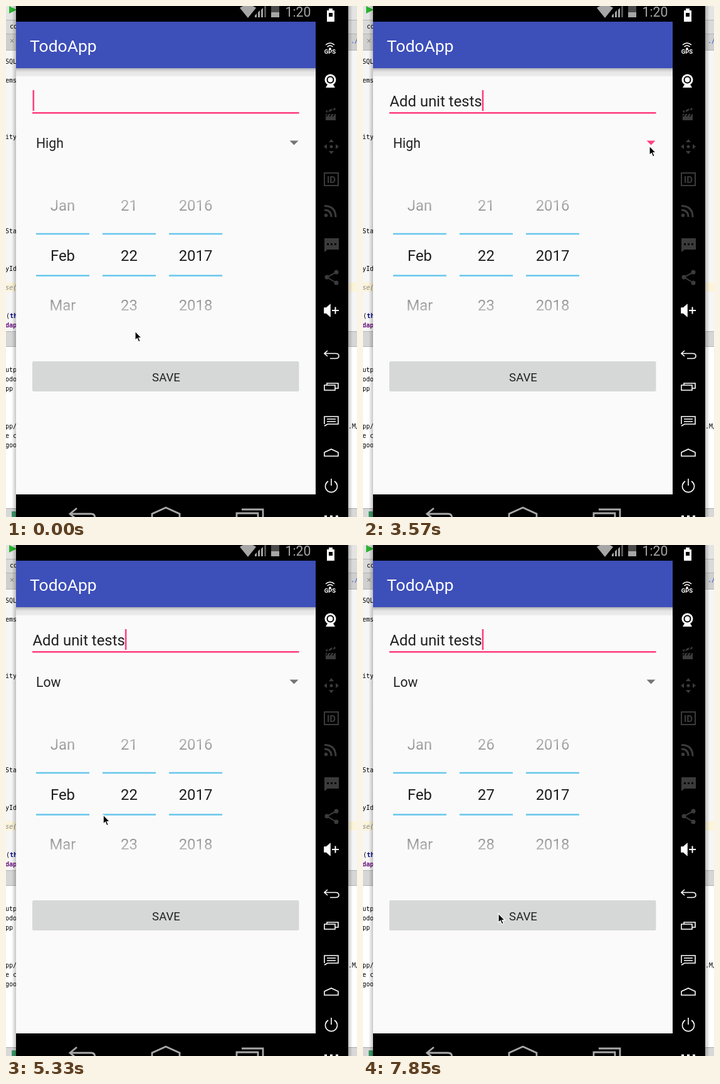
Recreate the animation shown at these times as an HTML page. Size 560x814 px, loop 8 s.

```html
<!DOCTYPE html>
<html lang="en">
<head>
<meta charset="utf-8">
<title>TodoApp</title>
<style>
  html, body { margin: 0; height: 100%; overflow: hidden; background: #fff; }
  svg { display: block; width: 560px; height: 814px; font-family: Roboto, sans-serif; }
  text { white-space: pre; }
  .code { font: 10px "DejaVu Sans Mono", monospace; }
  .pick { font-size: 23.9px; text-anchor: middle; fill: url(#fade); }
  .line { fill: none; stroke: #fff; stroke-width: 1.6; }
  .item { font-size: 18.6px; fill: #111; }
  #sheet { filter: drop-shadow(0 3px 4px #0008); }
</style>
</head>
<body>
<svg viewBox="0 0 560 814">
  <defs>
    <linearGradient id="fade" gradientUnits="userSpaceOnUse" x1="0" x2="0" y1="278" y2="517">
      <stop offset="0" stop-color="#1c1c1c" stop-opacity="0"/>
      <stop offset=".44" stop-color="#1c1c1c"/>
      <stop offset=".56" stop-color="#1c1c1c"/>
      <stop offset="1" stop-color="#1c1c1c" stop-opacity="0"/>
    </linearGradient>
    <linearGradient id="drop" x2="0" y2="1">
      <stop offset="0" stop-color="#a9abb5"/>
      <stop offset=".25" stop-color="#d2d2d4"/>
      <stop offset=".5" stop-color="#e6e6e6"/>
      <stop offset="1" stop-color="#ececec"/>
    </linearGradient>
    <linearGradient id="edge">
      <stop offset="0" stop-opacity="0"/>
      <stop offset="1" stop-opacity=".22"/>
    </linearGradient>
  </defs>

  <!-- editor window behind the phone -->
  <g id="editor">
    <rect width="560" height="814" fill="#f6f6f6"/>
    <rect width="560" height="22" fill="#e4e4e4"/>
    <rect y="22" width="560" height="22" fill="#dadada"/>
    <rect y="44" width="560" height="26" fill="#cfcfcf"/>
    <path d="M0 22.5H560M0 44.5H560M0 70.5H560" stroke="#b4b4b4"/>
    <rect y="440" width="560" height="15" fill="#fbf4da"/>
    <rect y="518" width="560" height="25" fill="#d6d6d6"/>
    <path d="M0 518.5H560M0 542.5H560" stroke="#b4b4b4"/>
    <rect y="543" width="560" height="257" fill="#fff"/>
    <rect y="800" width="560" height="14" fill="#d8d8d8"/>
    <path d="M0 800.5H560" stroke="#aaa"/>
    <path d="M5 0L17 6L5 12Z" fill="#27b52c"/>
    <rect x="9" y="805" width="9" height="9" fill="#3f9b6a"/>
    <path d="M7 53l5 5m0-5l-5 5" stroke="#666"/>
    <g class="code">
      <text x="6" y="36">co</text>
      <text x="550" y="59" fill="#2b50c8">./a</text>
      <text x="0" y="497">(<tspan fill="#000080" font-weight="bold">th</tspan></text>
      <text x="-1" y="512" fill="#660e7a" font-weight="bold">dap</text>
      <text x="-1" y="452" fill="#888" font-style="italic">se(</text>
      <text x="546" y="673">.M/</text>
    </g>
  </g>
  <rect x="9" width="7" height="814" fill="url(#edge)"/>
  <rect x="546" width="7" height="814" fill="url(#edge)" transform="matrix(-1 0 0 1 1099 0)"/>

  <!-- phone -->
  <rect x="16" width="530" height="814"/>
  <rect x="16" y="25" width="478" height="753" fill="#fafafa"/>
  <rect x="16" y="25" width="478" height="74.500" fill="#3d4fb9"/>
  <rect x="16" y="99" width="478" height="13" fill="url(#drop)"/>
  <text x="38" y="73" font-size="26.500" fill="#fff">TodoApp</text>
  <g fill="#a6a6a6">
    <path d="M373 3Q386 -6 399 3L386 19Z"/>
    <path d="M397 18v-3l3-3v6zm5 0v-8l3-3v11zm5 0V6l3-3v15z"/>
    <path d="M412 18V1l3-3v20z" fill="#555"/>
    <path d="M423 0h13v10h-13z" fill="#4a4a4a"/>
    <path d="M423 10h13v8h-13z"/>
    <text x="445.500" y="17" font-size="21.200">1:20</text>
  </g>
  <g class="line" style="stroke:#a8a8a8;stroke-width:2.8">
    <path d="M113 800L102 809L113 818M102 809H136Q142 809 142 816"/>
    <path d="M233 816V809L255 799L277 809V816"/>
    <path d="M368 816V808H402V816M376 802H410V816"/>
  </g>

  <!-- emulator side bar -->
  <g fill="#fff">
    <path d="M515 4h6v3h3v18h-12V7h3z"/>
    <rect x="515" y="11" width="6" height="6" fill="#000"/>
    <path class="line" d="M510 62q7-6 14 0M512.500 65q4.500-4 9 0"/>
    <circle cx="517" cy="68" r="1.800"/>
    <text x="517" y="76" font-size="9.500" font-weight="bold" text-anchor="middle">GPS</text>
    <circle cx="517.500" cy="117.500" r="9"/>
    <circle cx="517.500" cy="117.500" r="5" fill="none" stroke="#000" stroke-width="2"/>
    <path d="M513 125h9l3 5h-15z"/>
    <path class="line" d="M508 481h3l6-5v18l-6-5h-3z" style="fill:#fff"/>
    <path class="line" d="M520 485h11M525.500 479.500v11" style="stroke-width:2"/>
  </g>
  <g fill="#3b3b3b">
    <path d="M510 172h16v10h-16zM510 167l15-5 1 3-15 5z"/>
    <path d="M513 169l3-5m4 3l3-5M514 172l-3 4m8-4l-3 4m8-4l-3 4" stroke="#000" stroke-width="1.500"/>
    <path d="M519 212l4 5h-8zm0 24l4-5h-8zm-12-12l5-4v8zm24 0l-5-4v8z"/>
    <circle cx="519" cy="224" r="2.500"/>
    <rect x="508" y="266" width="22" height="20" fill="none" stroke="#3b3b3b" stroke-width="2"/>
    <text x="519" y="282" font-size="15" font-weight="bold" text-anchor="middle">ID</text>
    <circle cx="510.500" cy="333.500" r="2.800"/>
    <path d="M508 325q11 0 11 11M508 318.500q18 0 18 18" fill="none" stroke="#3b3b3b" stroke-width="3"/>
    <path d="M508 370h23v18h-18l-5 4z"/>
    <path d="M512 378h3v3h-3zm6 0h3v3h-3zm6 0h3v3h-3z" fill="#000"/>
    <path d="M527 424L512 432L527 441" fill="none" stroke="#3b3b3b" stroke-width="2"/>
    <circle cx="527" cy="424" r="3.500"/><circle cx="512" cy="432" r="3.500"/><circle cx="527" cy="441" r="3.500"/>
  </g>
  <g class="line">
    <path d="M513 549l-5 4.500 5 4.500M508 553.500h18q5 0 5 4t-5 4h-9"/>
    <path d="M508 604h17v8h-17zM512 604v-3h18v8h-5"/>
    <path d="M508 666v-12h22v12h-17l-5 3M512 658h14M512 662h14"/>
    <path d="M508 717v-6l11-5 11 5v6z"/>
    <path d="M514 757a9.500 9.500 0 1 0 10 0M519 753v11"/>
    <path d="M508 813h4m5 0h4m5 0h4" style="stroke-width:3"/>
  </g>

  <!-- form -->
  <rect x="42" y="169" width="425.500" height="2.600" fill="#ff4081"/>
  <text id="task" x="42.500" y="160" font-size="23.900" fill="#212121"></text>
  <rect id="caret" y="134" width="2.600" height="33" fill="#ff4081"/>
  <text id="level" x="48" y="226" font-size="21.200" fill="#212121"></text>
  <path id="arrow" d="M452.500 214.500h14l-7 7z"/>
  <g id="press">
    <rect x="154" y="431" width="85" height="30" fill="#ebebeb"/>
    <rect x="154" y="461" width="85" height="43" fill="#f1f1f1"/>
  </g>
  <path d="M48 363h85m21 0h85m21 0h85M48 429.500h85m21 0h85m21 0h85" stroke="#66c6ec" stroke-width="2.700"/>
  <g id="picker" class="pick"></g>
  <rect x="42" y="566" width="425.500" height="48" rx="2.500" fill="#d6d8d7"/>
  <text x="255.500" y="597.500" font-size="18.600" fill="#212121" text-anchor="middle">SAVE</text>

  <!-- drop-down -->
  <rect id="ghost" x="40" y="202" width="409" height="191" rx="3" fill="none" stroke="#000" stroke-opacity=".07" stroke-width="4"/>
  <g id="popup">
    <rect id="sheet" x="37" y="202" width="414.500" height="191" rx="2" fill="#fafafa"/>
    <g class="item">
      <text x="48" y="241.500">High</text>
      <text x="48" y="305">Medium</text>
      <text x="48" y="369">Low</text>
    </g>
  </g>
  <path id="pointer" d="M0 0V14.500L3.300 11.500L5.600 17L8.200 15.800L5.900 10.600H10.300Z" stroke="#fff" stroke-width="1.200"/>
</svg>
<script>
const LOOP = 8000, STEP = 148.1, ROW = 79.5, FIRST_CLICK = 5814, CLICK_GAP = 240;
const TASK = 'Add unit tests';
// When each further part of the task has been typed: [ms, characters]
const TYPED = [[0, 0], [290, 1], [740, 2], [880, 3], [1030, 4], [1180, 5], [1330, 6], [1480, 7],
  [1625, 8], [1775, 9], [1920, 11], [2220, 12], [2370, 13], [2660, 14]];
// Pointer stops: [ms, x, y]
const PATH = [[0, 206, 518], [2740, 206, 518], [2970, 420, 462], [3270, 492, 300], [3550, 457, 223],
  [3860, 457, 223], [4440, 101, 362], [4800, 101, 362], [5480, 192, 476], [6990, 192, 476],
  [7700, 216, 587], [LOOP, 216, 587]];

const $ = id => document.getElementById(id);
const show = (el, on) => el.setAttribute('visibility', on ? 'visible' : 'hidden');
const within = (t, a, b) => t >= a && t < b;

function addText(parent, x, y, label) {
  const el = document.createElementNS('http://www.w3.org/2000/svg', 'text');
  el.setAttribute('x', x);
  el.setAttribute('y', y);
  el.textContent = label;
  return parent.appendChild(el);
}

[[92, 'SQL'], [122, 'ems'], [212, 'ity'], [362, 'Sta'], [422, 'yId'], [583, 'utp'],
  [598, 'odo'], [613, 'pp '], [673, 'pp/'], [688, 'e c'], [703, 'goo']]
  .forEach(([y, label]) => addText(document.querySelector('.code'), -1, y, label));

const rowY = row => 405.5 + row * ROW;
['Jan', 'Feb', 'Mar'].forEach((m, i) => addText($('picker'), 90.5, rowY(i - 1), m));
[2016, 2017, 2018].forEach((y, i) => addText($('picker'), 302.5, rowY(i - 1), y));
const days = [-2, -1, 0, 1, 2].map(row => addText($('picker'), 196.5, rowY(row), ''));

function pointerAt(t) {
  const i = PATH.findIndex(p => p[0] > t);
  const [t0, x0, y0] = PATH[i - 1], [t1, x1, y1] = PATH[i];
  const u = (t - t0) / (t1 - t0), e = u * u * (3 - 2 * u);
  return [x0 + (x1 - x0) * e, y0 + (y1 - y0) * e];
}

// Each click scrolls the day by one row with a strong deceleration
function daysScrolled(t) {
  if (t < FIRST_CLICK) return 0;
  const n = Math.min(4, Math.floor((t - FIRST_CLICK) / CLICK_GAP));
  const u = Math.min(1, (t - FIRST_CLICK - n * CLICK_GAP) / 300);
  return n + 1 - (1 - u) ** 5;
}

function caretOn(t) {
  if (t > 4800) return Math.floor((t - 4800) / 500) % 2 === 0;
  return !within(t, 3100, 3500);
}

function render(t) {
  const typed = TYPED.filter(k => k[0] <= t).pop()[1];
  $('task').textContent = TASK.slice(0, typed);
  $('caret').setAttribute('x', 42.5 + (typed ? $('task').getComputedTextLength() : 0));
  show($('caret'), caretOn(t));

  $('level').textContent = t < 4700 ? 'High' : 'Low';
  $('arrow').setAttribute('fill', within(t, 3500, 3800) ? '#ff4081' : '#757575');

  const scroll = daysScrolled(t), base = Math.round(scroll);
  days.forEach((el, i) => {
    el.textContent = (21 + base + i - 2) % 28 + 1;
    el.setAttribute('y', rowY(base + i - 2 - scroll));
  });
  show($('press'), within(t, FIRST_CLICK, 7000));

  const closing = within(t, 4700, 4850);
  show($('popup'), within(t, 3800, 4850));
  show($('ghost'), closing);
  $('popup').setAttribute('opacity', closing ? .78 : 1);
  $('popup').setAttribute('transform', closing ? 'translate(244 200) scale(.972) translate(-244 -200)' : '');

  $('pointer').setAttribute('transform', `translate(${pointerAt(t)})`);
}

function tick() {
  const t = performance.now() % LOOP;
  render(Math.min(53, Math.floor(t / STEP)) * STEP);
  requestAnimationFrame(tick);
}
tick();
</script>
</body>
</html>
```
